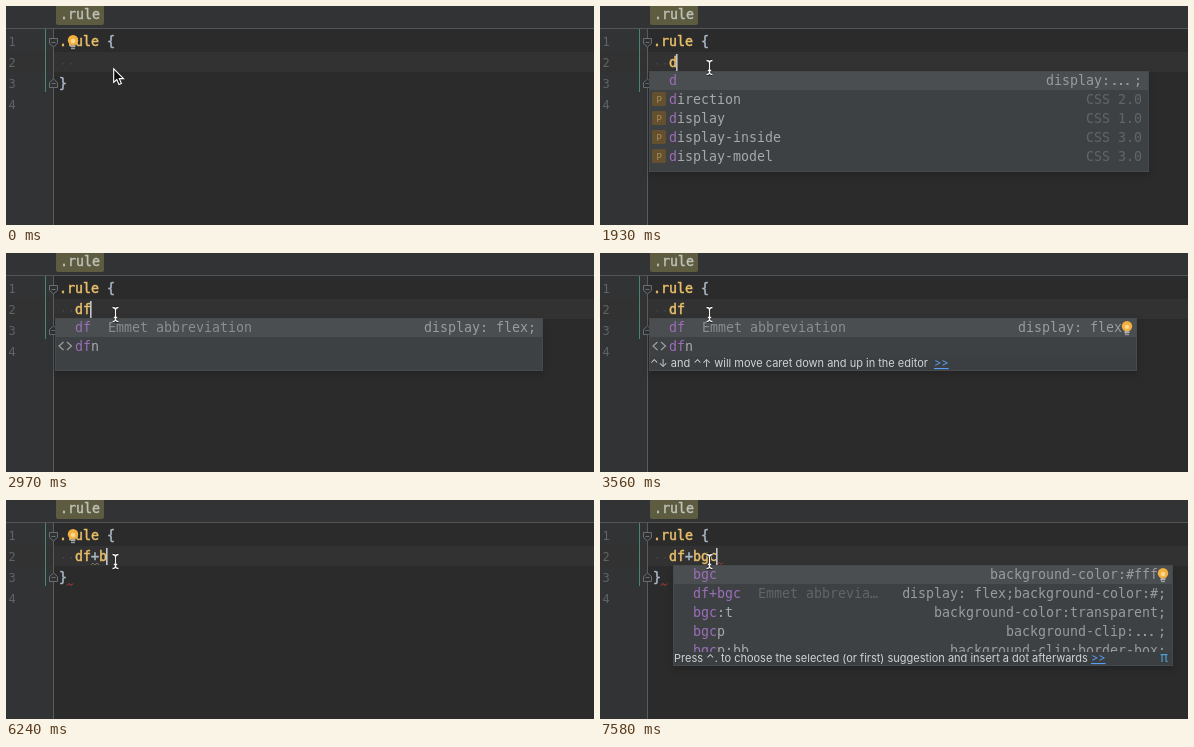
These frames come from a looping animation (588x219 px, 8000 ms). An HTML page:

```html
<!DOCTYPE html>
<html lang="en">
<head>
<meta charset="utf-8">
<title>CSS completion</title>
<style>
html, body { margin: 0; width: 100%; height: 100%; overflow: hidden; background: #2b2b2b; }
svg { display: block; width: 588px; height: 219px; }
text { font: 13.29px "DejaVu Sans Mono", "Noto Sans Mono", monospace; }
.num { font-size: 12px; fill: #606366; }
.code { fill: #e8bf6a; stroke: #e8bf6a; stroke-width: .5px; }
.brace { fill: #a9b7c6; stroke: #a9b7c6; stroke-width: .5px; }
.crumb { fill: #bfc1b8; stroke: #bfc1b8; stroke-width: .45px; }
.name { fill: #a6a8aa; }
.hit { fill: #9a6fb8; }
.tail { fill: #8a8c8e; }
.right { fill: #999b9d; text-anchor: end; }
.dim { fill: #626567; }
.hint { font: 11px Inter, "Open Sans", "DejaVu Sans", sans-serif; fill: #d0d2d4; }
.link { fill: #589df6; text-decoration: underline; }
.wave { fill: none; stroke-width: 1; }
</style>
</head>
<body>
<svg id="stage" viewBox="0 0 588 219" xmlns="http://www.w3.org/2000/svg">
  <rect width="588" height="219" fill="#2b2b2b"/>
  <rect width="48" height="219" fill="#313335"/>
  <rect y="46" width="588" height="20" fill="#323232"/>
  <rect width="588" height="22" fill="#313335"/>
  <rect y="22" width="588" height="1" fill="#525455"/>
  <rect x="50" y="-3" width="48" height="22" rx="2" fill="#5d5c41"/>
  <text x="54" y="13" class="crumb">.rule</text>
  <rect x="47" y="23" width="1" height="196" fill="#595b5d"/>
  <rect x="39" y="23" width="1" height="63" fill="#4a8570"/>
  <g fill="#2f3133" stroke="#6b6e70">
    <path d="M43.5 32.5h8v5l-4 3.5l-4-3.5zM45.5 36.5h4"/>
    <path d="M43.5 81.5h8v-5l-4-3.5l-4 3.5zM45.5 77.5h4"/>
  </g>
  <g fill="#444648"><rect x="56.5" y="57" width="1.5" height="1.5"/><rect x="64.5" y="57" width="1.5" height="1.5"/></g>
</svg>
<script>
const NS = 'http://www.w3.org/2000/svg', LOOP = 8000, CH = 8;
const stage = document.getElementById('stage');
const timed = [];

function add(tag, attrs, parent = stage, content) {
  const el = document.createElementNS(NS, tag);
  for (const k in attrs) el.setAttribute(k, attrs[k]);
  if (content !== undefined) el.textContent = content;
  return parent.appendChild(el);
}
const rect = (x, y, width, height, fill, parent) => add('rect', { x, y, width, height, fill }, parent);
const text = (x, y, cls, str, parent) => add('text', { x, y, class: cls }, parent, str);

// spans: [on, off, on, off, ...] in ms
function at(spans, el) {
  timed.push({ el, spans });
  return el;
}
const group = (...spans) => at(spans, add('g', {}));

function bulb(cx, top, parent) {
  add('circle', { cx, cy: top + 5.3, r: 5.2, fill: '#f2af3e' }, parent);
  add('circle', { cx, cy: top + 6, r: 2.3, fill: '#fbd690' }, parent);
  rect(cx - 2.5, top + 10.3, 5, 1.6, '#b9bbbd', parent);
  rect(cx - 2, top + 12.6, 4, 1.6, '#96999b', parent);
}

function wave(x, y, width, stroke, spans) {
  let d = `M${x} ${y}`;
  for (let i = 2; i <= width; i += 2) d += `L${x + i} ${y + (i % 4 ? -2 : 0)}`;
  at(spans, add('path', { d, stroke, class: 'wave' }));
}

function icon(kind, x, y, parent) {
  if (kind === 'P') {
    add('rect', { x, y, width: 14, height: 14, rx: 1.5, fill: '#64502f' }, parent);
    add('text', { x: x + 4.2, y: y + 10.5, style: 'font-size:9.5px', fill: '#a98a55' }, parent, 'P');
  } else if (kind === '<>') {
    add('path', { d: `M${x + 5.5} ${y + 3}l-4.5 4l4.5 4M${x + 9} ${y + 3}l4.5 4l-4.5 4`,
      fill: 'none', stroke: '#9da0a2', 'stroke-width': 1.2 }, parent);
  }
}

// an ellipsis takes three cells, its dots sit closer together
function value(end, y, str, parent) {
  const [head, rest] = str.split('...');
  const cls = str.startsWith('CSS') ? 'right dim' : 'right';
  if (rest === undefined) return text(end, y, cls, str, parent);
  const dots = end - (rest.length + 3) * CH;
  text(end, y, cls, rest, parent);
  text(dots, y, cls, head, parent);
  for (let k = 0; k < 3; k++) rect(dots + 3.5 + k * 6.5, y - 2, 2, 2, '#999b9d', parent);
}

// rows: [name, matched length, value, icon, tail]
function popup(spans, x, right, height, rows, hint, linkX, pi) {
  const g = group(...spans), w = right - x, bottom = 65 + height;
  add('rect', { x, y: 65, width: w, height, fill: '#3e4143',
    style: 'filter:drop-shadow(0 3px 3px rgba(0,0,0,.2))' }, g);
  rect(x, 65, w, 19, '#4b4e50', g);
  rows.forEach(([name, hit, info, kind, tail], i) => {
    const y = 79 + i * 19, tx = x + 20;
    icon(kind, x + 3, y - 12, g);
    text(tx, y, 'hit', name.slice(0, hit), g);
    text(tx + hit * CH, y, 'name', name.slice(hit), g);
    if (tail) text(tx + name.length * CH + 17, y, i ? 'dim' : 'tail', tail, g);
    if (info) value(right - 7, y, info, g);
  });
  if (hint) {
    rect(x, bottom - 14, w, 14, '#3c3f41', g);
    text(x + 1, bottom - 4, 'hint', hint, g);
    text(linkX, bottom - 4, 'hint link', '>>', g);
    if (pi) add('text', { x: right - 13, y: bottom - 4, fill: '#4b9fd0' }, g, 'π');
  }
  add('rect', { x: x + .5, y: 65.5, width: w - 1, height: height - 1, fill: 'none', stroke: '#464a4c' }, g);
}

['1', '2', '3', '4'].forEach((n, i) => text(2.5, 40 + i * 21, 'num', n));
text(53, 40, 'code', '.rule');
text(101, 40, 'brace', '{');
text(53, 82, 'brace', '}');

// typing
[['d', 1780], ['f', 2970], ['+', 3710], ['b', 6240], ['g', 6690], ['c', 6980]].forEach(([c, t], i) =>
  at([t, LOOP], text(69 + i * CH, 61, c === '+' ? 'brace' : 'code', c)));
wave(61, 85.5, 7, '#c4403f', [4000, LOOP]);
wave(85, 65, 8, '#77715c', [4000, 6690]);
wave(93, 65, 6, '#77715c', [4000, 6240]);
wave(117, 64.5, 7, '#a8403f', [6980, LOOP]);

[[1780, 2530], [2970, 3560], [3710, 5050, 5490, 5940], [6240, 6690], [6690, 6980], [6980, LOOP]]
  .forEach((spans, i) => at(spans, rect(76 + i * CH, 48, 1.6, 17, '#c4c6c8')));

bulb(67, 29, group(0, 440, 4600, 6390));

// completion lists
const dotHint = 'Press ⌃. to choose the selected (or first) suggestion and insert a dot afterwards';
const moveHint = '⌃↓ and ⌃↑ will move caret down and up in the editor';
const forD = [
  ['d', 1, 'display:...;'],
  ['direction', 1, 'CSS 2.0', 'P'],
  ['display', 1, 'CSS 1.0', 'P'],
  ['display-inside', 1, 'CSS 3.0', 'P'],
  ['display-model', 1, 'CSS 3.0', 'P']
];
const forDf = [
  ['df', 2, 'display: flex;', '', 'Emmet abbreviation'],
  ['dfn', 2, '', '<>']
];
const cut = 'Emmet abbrevia…';
const forB = [
  ['b', 1, 'bottom:...;'],
  ['df+b', 4, 'display: flex;bottom:;', '', cut],
  ['bd', 1, 'border:...;'],
  ['bg', 1, 'background:#000;'],
  ['bdb', 1, 'border-bottom:...;']
];
const forBg = [
  ['bg', 2, 'background:#000;'],
  ['df+bg', 5, 'display: flex;background:#;', '', cut],
  ['bga', 2, 'background-attachment:...;'],
  ['bgc', 2, 'background-color:#fff;'],
  ['bgcp', 2, 'background-clip:...;']
];
const forBgc = [
  ['bgc', 3, 'background-color:#fff;'],
  ['df+bgc', 6, 'display: flex;background-color:#;', '', cut],
  ['bgc:t', 3, 'background-color:transparent;'],
  ['bgcp', 3, 'background-clip:...;'],
  ['bgcp:bb', 3, 'background-clip:border-box;']
];
popup([1930, 2080], 49, 549, 101, forD);
popup([2080, 2970], 49, 549, 101, forD, dotHint, 467, true);
popup([2970, 3120], 49, 537, 53, forDf);
popup([3120, 3710], 49, 537, 53, forDf, moveHint, 334);
popup([6390, 6690], 73, 573, 101, forB);
popup([6690, 7130], 73, 573, 101, forBg, dotHint, 491, true);
popup([7130, LOOP], 73, 573, 101, forBgc, dotHint, 491, true);

bulb(539, 68, group(2820, 2970));
bulb(527, 68, group(3560, 3710));
bulb(563, 68, group(7580, LOOP));

// mouse pointer
[[107, 62, 0, 140], [107, 57, 140, 440], [110, 51, 440, 580]].forEach(([x, y, on, off]) =>
  at([on, off], add('path', {
    d: 'M.7 .9V14.3L3.8 11.5L6 16.5L8.4 15.5L6.3 10.6H10.5Z',
    transform: `translate(${x} ${y})`, fill: '#0c0c0c', stroke: '#fff', 'stroke-width': 1.1
  })));
const beam = group(580, LOOP);
for (const [stroke, width] of [['#141414', 3.2], ['#f4f4f4', 1.3]])
  add('path', {
    d: 'M106.5 54.5Q109.5 54.5 109.5 57Q109.5 54.5 112.5 54.5M109.5 56V67' +
       'M106.5 68.5Q109.5 68.5 109.5 66Q109.5 68.5 112.5 68.5M107.8 64.5H111.2',
    fill: 'none', stroke, 'stroke-width': width
  }, beam);

function draw() {
  const t = performance.now() % LOOP;
  for (const { el, spans } of timed) {
    let on = false;
    for (let i = 0; i < spans.length; i += 2) on = on || (t >= spans[i] && t < spans[i + 1]);
    el.style.visibility = on ? 'visible' : 'hidden';
  }
  requestAnimationFrame(draw);
}
draw();
</script>
</body>
</html>
```
